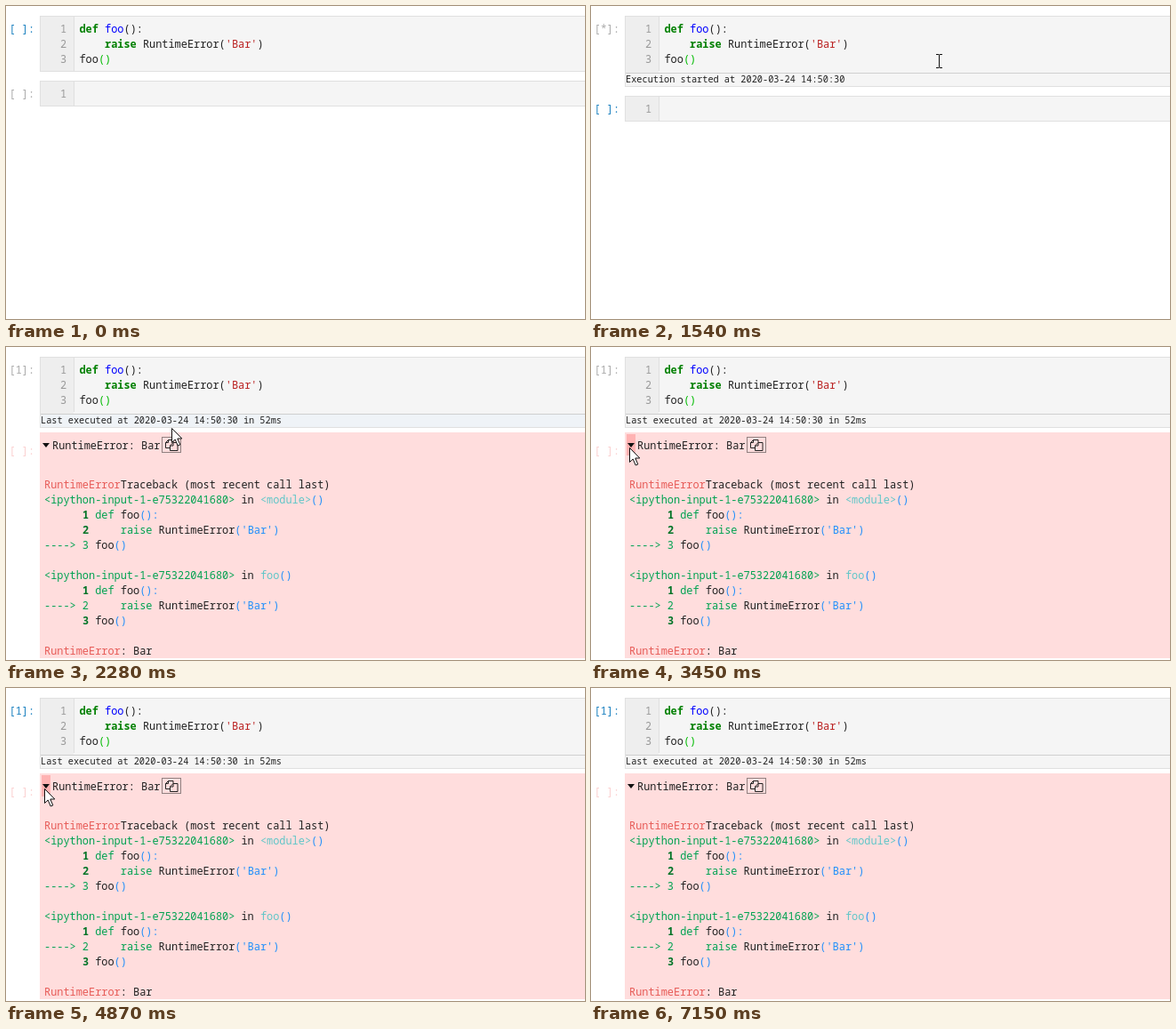
Recreate the animation shown at these times as an HTML page. Size 651x352 px, loop 7780 ms.

```html
<!DOCTYPE html>
<html lang="en">
<head>
<meta charset="utf-8">
<title>Notebook error output</title>
<style>
html, body { margin: 0; width: 100%; height: 100%; overflow: hidden; background: #fff; }
svg { display: block; }
text { font: 11.91px "Noto Sans Mono", "DejaVu Sans Mono", monospace; white-space: pre; fill: #212121; }
.small { font-size: 10.27px; }
.num { fill: #999; }
.kw { fill: #008000; font-weight: bold; }
.def { fill: #00f; }
.str { fill: #ba2121; }
.match { fill: #0b0; }
.r { fill: #e75c58; }
.g { fill: #00a250; }
.n { fill: #007427; font-weight: 600; }
.c { fill: #60c6c8; }
.b { fill: #208ffb; }
.prompt { fill: #aaa; }
.prompt.on { fill: #1a80c0; }
.faint { fill: #fbd0d0; }
.box { fill: #f5f5f5; stroke: #e0e0e0; }
.box.on { fill: #fff; stroke: #2196f3; }
.gutter { fill: #eee; }
.pink { fill: #fdd; }
.hover { fill: #ffb3b3; }
</style>
</head>
<body>
<svg width="651" height="352" viewBox="0 0 651 352">
  <rect id="box" class="box" x="38.5" y="11.5" width="640" height="62"/>
  <path class="gutter" d="M39 12h37v61h-37z"/>
  <path stroke="#e0e0e0" d="M76.5 12v61"/>
  <text id="prompt" class="prompt" x="3.5" y="30"></text>
  <g id="code"></g>

  <g id="bar">
    <path fill="#f5f5f5" d="M38 73h640v3h-640z"/>
    <path class="gutter" d="M39 73h37v3h-37z"/>
    <path id="barFill" d="M38 76h640v15h-640z"/>
    <path stroke="#cfcfcf" d="M38 75.5h640"/>
    <path stroke="#e0e0e0" d="M38 90.5h640M38.5 73v18"/>
    <text id="stamp" class="small" x="39" y="86"></text>
  </g>

  <g id="next">
    <rect class="box" x="38.5" y=".5" width="640" height="28"/>
    <path class="gutter" d="M39 1h37v27h-37z"/>
    <path stroke="#e0e0e0" d="M76.5 1v27"/>
    <text class="num" x="61" y="19">1</text>
    <text id="prompt2" class="prompt" x="3.5" y="19">[ ]:</text>
  </g>

  <g id="out">
    <svg width="38" height="352"><text class="faint" x="3.5" y="121">[ ]:</text></svg>
    <rect id="panel" class="pink" x="38" y="96" width="640"/>
    <rect id="toggle" class="hover" x="40" y="98"/>
    <path id="arrow" fill="#111"/>
    <g id="head">
      <text x="52" y="115">RuntimeError: Bar</text>
      <rect id="copy" x="175.5" y="101.5" width="21" height="17" fill="none" stroke="#222" stroke-dasharray="1 1"/>
      <path fill="none" stroke="#222"
        d="M184.500 113.500h-5v-6l3-3h5.500v3M182.500 104.500v3h-3M188 107.500h5v9h-8.500v-5.500zM188 107.500v3.500h-3.500"/>
    </g>
    <g id="trace"></g>
  </g>

  <path id="beam" fill="none" stroke="#111" d="M-3.500-7.500h3l.5.5.5-.5h3M0-7v14M-3.500 7.500h3l.5-.5.5.5h3"/>
  <path id="mouse" fill="#fff" stroke="#111" d="M.5.5v16l3.700-3.500 3 7 2.600-1.100-3-6.900h5z"/>
</svg>
<script>
const LOOP = 7780;
const el = id => document.getElementById(id);
const show = (id, on) => el(id).style.display = on ? '' : 'none';
const put = (id, x, y) => el(id).setAttribute('transform', `translate(${x} ${y})`);
const attrs = (id, o) => { for (const k in o) el(id).setAttribute(k, o[k]); };

// Markup: {class|text}
const rich = s => s.replace(/</g, '&lt;').replace(/{(\w+)\|([^}]*)}/g, '<tspan class="$1">$2</tspan>');
const lines = (id, x, y, rows) =>
  el(id).innerHTML = rows.map((s, i) => `<text x="${x}" y="${y + 17 * i}">${rich(s)}</text>`).join('');

lines('code', 61, 30, [
  '{num|1}  {kw|def} {def|foo}():',
  "{num|2}      {kw|raise} RuntimeError({str|'Bar'})",
  '{num|3}  foo{match|()}'
]);
const file = '{g|<ipython-input-1-e75322041680>} in ';
const defLine = '      {n|1} {g|def} foo{b|():}';
const raised = "{g|raise} RuntimeError{b|('Bar')}";
lines('trace', 43, 159, [
  '{r|RuntimeError}Traceback (most recent call last)',
  file + '{c|<module>}{b|()}',
  defLine,
  '      {n|2}     ' + raised,
  '{g|----> 3} foo{b|()}',
  '',
  file + '{c|foo}{b|()}',
  defLine,
  '{g|----> 2}     ' + raised,
  '      {n|3} foo{b|()}',
  '',
  '{r|RuntimeError}: Bar'
]);

// Pointer track: time, x, y
const track = [
  [130, 457, 272], [850, 391, 77], [910, 391, 72], [1130, 391, 62], [1910, 391, 62],
  [2280, 186, 91], [2380, 186, 91], [2600, 17, 109], [2700, 9, 112], [2820, 21, 120],
  [2980, 21, 120], [3130, 37, 120], [3290, 37, 120], [3450, 43, 113], [5000, 43, 113],
  [5470, 188, 105], [5570, 188, 105], [5700, 194, 125], [5870, 200, 115], [6090, 200, 115],
  [6300, 188, 108], [6630, 188, 108], [7150, 614, 348]
];
function pointer(t) {
  const i = track.findIndex(p => p[0] > t);
  if (i < 1) return null;
  const [a, ax, ay] = track[i - 1], [b, bx, by] = track[i];
  const k = (t - a) / (b - a);
  return [Math.round(ax + (bx - ax) * k), Math.round(ay + (by - ay) * k)];
}

function draw(t) {
  const ran = t >= 1440, stamped = t >= 1540, done = t >= 1600;
  const picked = !ran || t >= 3520;
  const folded = t >= 3600 && t < 4770;

  el('box').classList.toggle('on', t >= 1070 && !ran);
  el('prompt').textContent = done ? '[1]:' : ran ? '[*]:' : '[ ]:';
  el('prompt').classList.toggle('on', picked);
  el('prompt2').classList.toggle('on', !picked);
  show('bar', stamped);
  el('stamp').textContent = done
    ? 'Last executed at 2020-03-24 14:50:30 in 52ms'
    : 'Execution started at 2020-03-24 14:50:30';
  show('next', !done || folded);
  put('next', 0, folded ? 128 : stamped ? 101 : 84);

  show('out', done);
  show('trace', !folded);
  attrs('panel', { height: folded ? 22 : 254 });
  attrs('toggle', { width: folded ? 7 : 10, height: folded ? 20 : 24 });
  attrs('arrow', { d: folded ? 'M41 103l5 4-5 4z' : 'M41 108h8l-4 5z' });
  put('head', folded ? -3 : 0, folded ? -3 : 0);

  const p = pointer(t);
  const over = (x0, y0, x1, y1) => p && p[0] >= x0 && p[0] <= x1 && p[1] >= y0 && p[1] <= y1;
  show('toggle', over(40, 97, 50, 122));
  el('barFill').style.fill = over(38, 75, 651, 91) ? '#eff3f7' : '#f5f5f5';
  el('copy').style.fill = over(175, 101, 197, 119) ? '#ffb3b3' : 'none';
  const text = over(38, 11, 651, 74);
  show('beam', text);
  show('mouse', p && !text);
  if (p) {
    put('beam', p[0] + .5, p[1]);
    put('mouse', p[0], p[1]);
  }
}

const start = performance.now();
function tick() {
  draw((performance.now() - start) % LOOP);
  requestAnimationFrame(tick);
}
tick();
</script>
</body>
</html>
```
